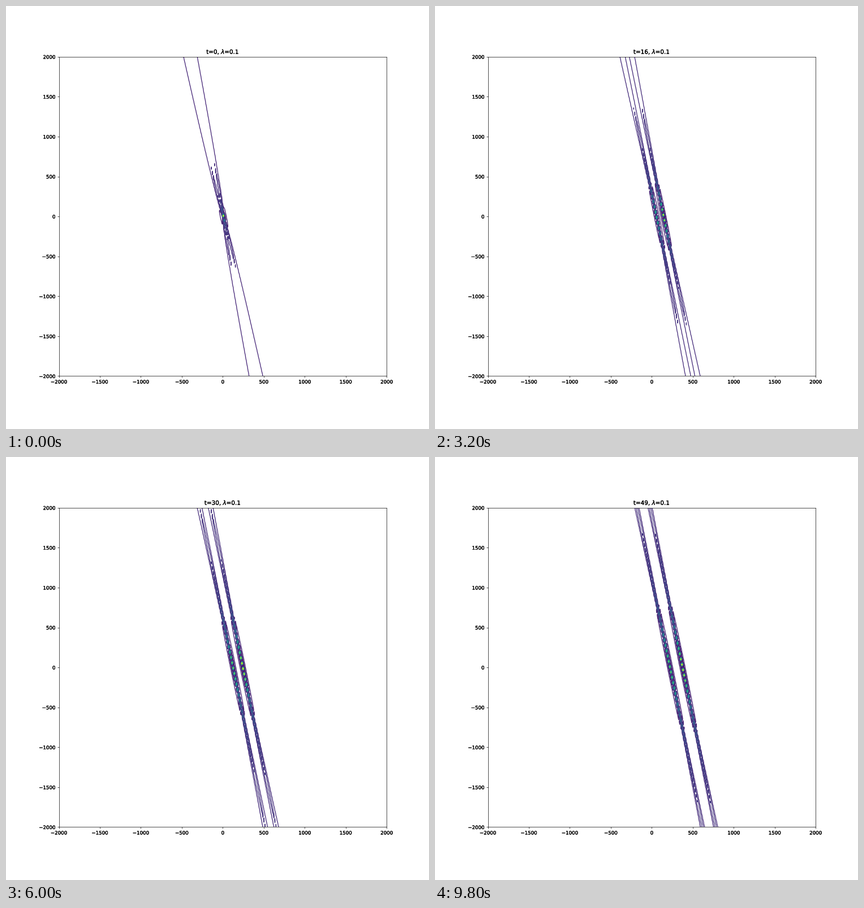
Recreate the animation shown at these times as a matplotlib script. Size 748 by 748 pixels, loop 10 s.

```python
import numpy as np
import matplotlib.pyplot as plt
from matplotlib import patheffects
from matplotlib.animation import FuncAnimation

FRAMES = 50
INTERVAL = 200
LIMIT = 2000
LAM = 0.1
SPEED = 50              # time units per frame
SHIFT = 1 / (2 * LAM)   # natural width of a lump

grid = np.linspace(-LIMIT, LIMIT, 300)
x, y = np.meshgrid(grid, grid)


def field(t):
    """Pair of lumps, u = 2 (log tau)'' with a quartic tau."""
    s = SHIFT
    time = SPEED * t
    a = 24 * LAM * time
    z = x + 2 * LAM * y - 12 * LAM**2 * time - s
    tau = ((z**2 - a)**2 + 4 * y**2 + s**2 * (6 * z**2 - 2 * a)
           - 8 * s**3 * z + 9 * s**4)
    d1 = 4 * z * (z**2 - a) + 12 * s**2 * z - 8 * s**3
    d2 = 12 * z**2 - 4 * a + 12 * s**2
    return 2 * (d2 / tau - (d1 / tau)**2)


plt.rcParams["font.family"] = "DejaVu Sans"
fig = plt.figure(figsize=(12, 12), dpi=62.3334, facecolor="white")
ax = fig.add_axes([0.125, 0.125, 0.775, 0.755])
ax.set_xlim(-LIMIT, LIMIT)
ax.set_ylim(-LIMIT, LIMIT)
ticks = np.arange(-LIMIT, LIMIT + 1, 500)
ax.set_xticks(ticks)
ax.set_yticks(ticks)

heavy = [patheffects.withStroke(linewidth=0.35, foreground="black")]
for label in ax.get_xticklabels() + ax.get_yticklabels() + [ax.title]:
    label.set_path_effects(heavy)


def draw(t):
    for item in list(ax.collections):
        item.remove()
    ax.contour(x, y, field(t), 50, cmap="viridis", linewidths=1.5)
    ax.set_title(rf"t={t}, $\lambda$={LAM}", fontsize=12)
    return []


anim = FuncAnimation(fig, draw, frames=FRAMES, init_func=lambda: draw(0),
                     interval=INTERVAL, repeat=True, repeat_delay=0)
plt.show()
```
